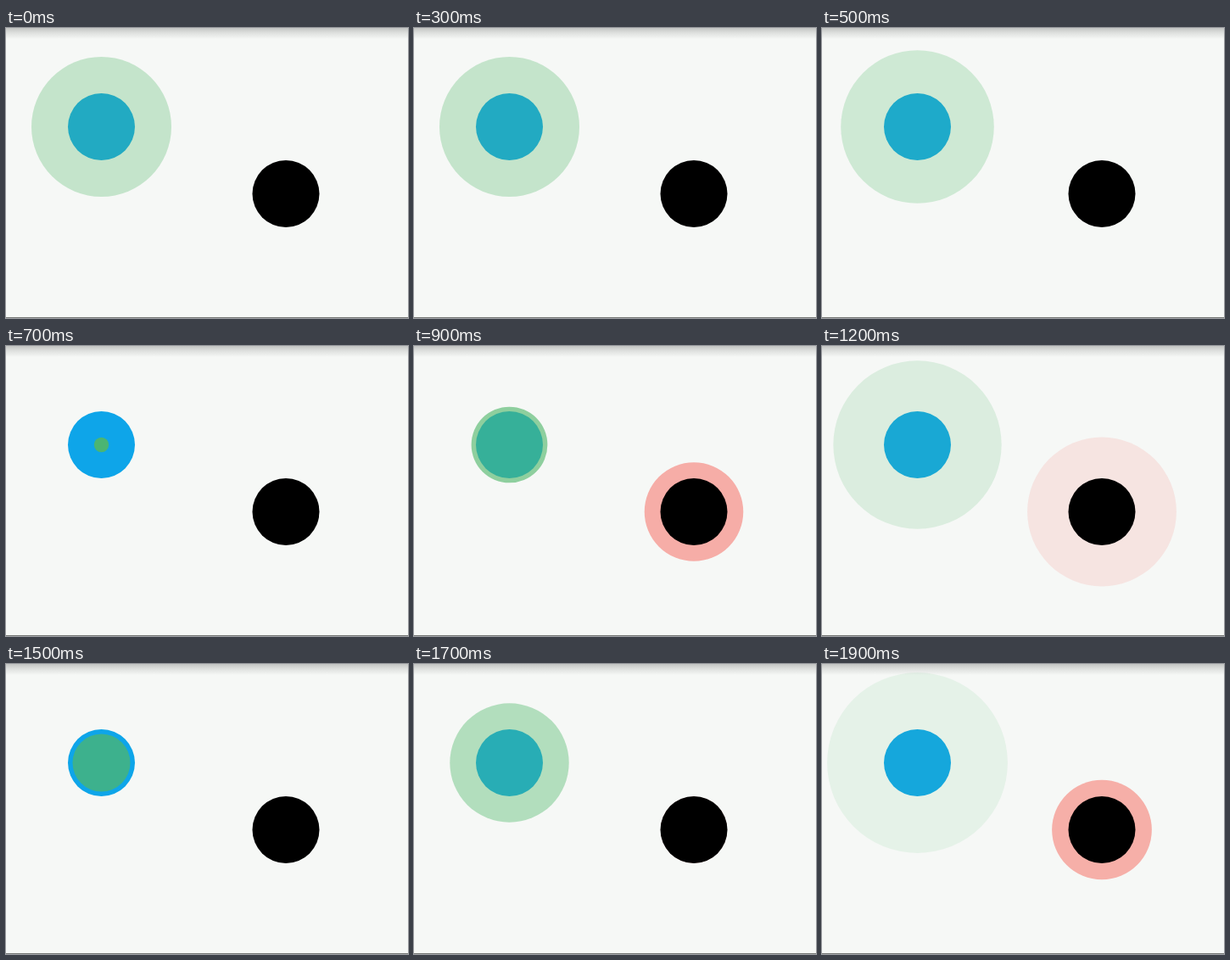
An HTML page that plays this animation: 474x342 px, repeating every 2 s.

```html
<!DOCTYPE html>
<html lang="en">
<head>
<meta charset="utf-8">
<title>Ripples</title>
<style>
  html, body { margin: 0; width: 100%; height: 100%; overflow: hidden; background: #f6f8f6; }
  svg { display: block; width: 474px; height: 342px; }
</style>
</head>
<body>
<svg viewBox="0 0 474 342">
  <defs>
    <linearGradient id="shade" x1="0" y1="0" x2="0" y2="1">
      <stop offset="0" stop-color="#c3c5c3"/>
      <stop offset=".4" stop-color="#dcdedc"/>
      <stop offset="1" stop-color="#f6f8f6"/>
    </linearGradient>
  </defs>
  <rect width="474" height="342" fill="#f6f8f6"/>
  <rect width="474" height="13" fill="url(#shade)"/>
  <rect y="341" width="474" height="1" fill="#777977"/>
  <circle cx="112.5" cy="116.5" r="39.5" fill="#0ea5e9"/>
  <circle id="green" cx="112.5" cy="116.5" fill="#50b769"/>
  <circle id="red" cx="330" cy="195.5" fill="#f44336"/>
  <circle cx="330" cy="195.5" r="39.5" fill="#000"/>
</svg>
<script>
  const LOOP = 2000, STEP = 100;
  const HOLD_END = 500, HOLD_TIME = 457;
  const BASE_RADIUS = 39.5;

  const ripples = [
    { node: document.getElementById('green'), scale: 3, duration: 655, starts: [1, 652, 1312] },
    { node: document.getElementById('red'), scale: 2.5, duration: 1000, starts: [310, 1304] }
  ];

  // Each ripple grows linearly from nothing while fading out.
  function drawRipple({ node, scale, duration, starts }, time) {
    const start = starts.filter(s => s <= time).pop();
    const progress = start === undefined ? 1 : Math.min(1, (time - start) / duration);
    node.setAttribute('r', BASE_RADIUS * scale * progress);
    node.setAttribute('opacity', 1 - progress);
  }

  // The picture rests at the start of the loop, then advances in steps.
  function render(elapsed) {
    const stepped = Math.floor((elapsed % LOOP) / STEP) * STEP;
    const time = stepped < HOLD_END ? HOLD_TIME : stepped;
    ripples.forEach(ripple => drawRipple(ripple, time));
  }

  let origin;
  function tick(now) {
    origin ??= now;
    render(now - origin);
    requestAnimationFrame(tick);
  }
  render(0);
  requestAnimationFrame(tick);
</script>
</body>
</html>
```
